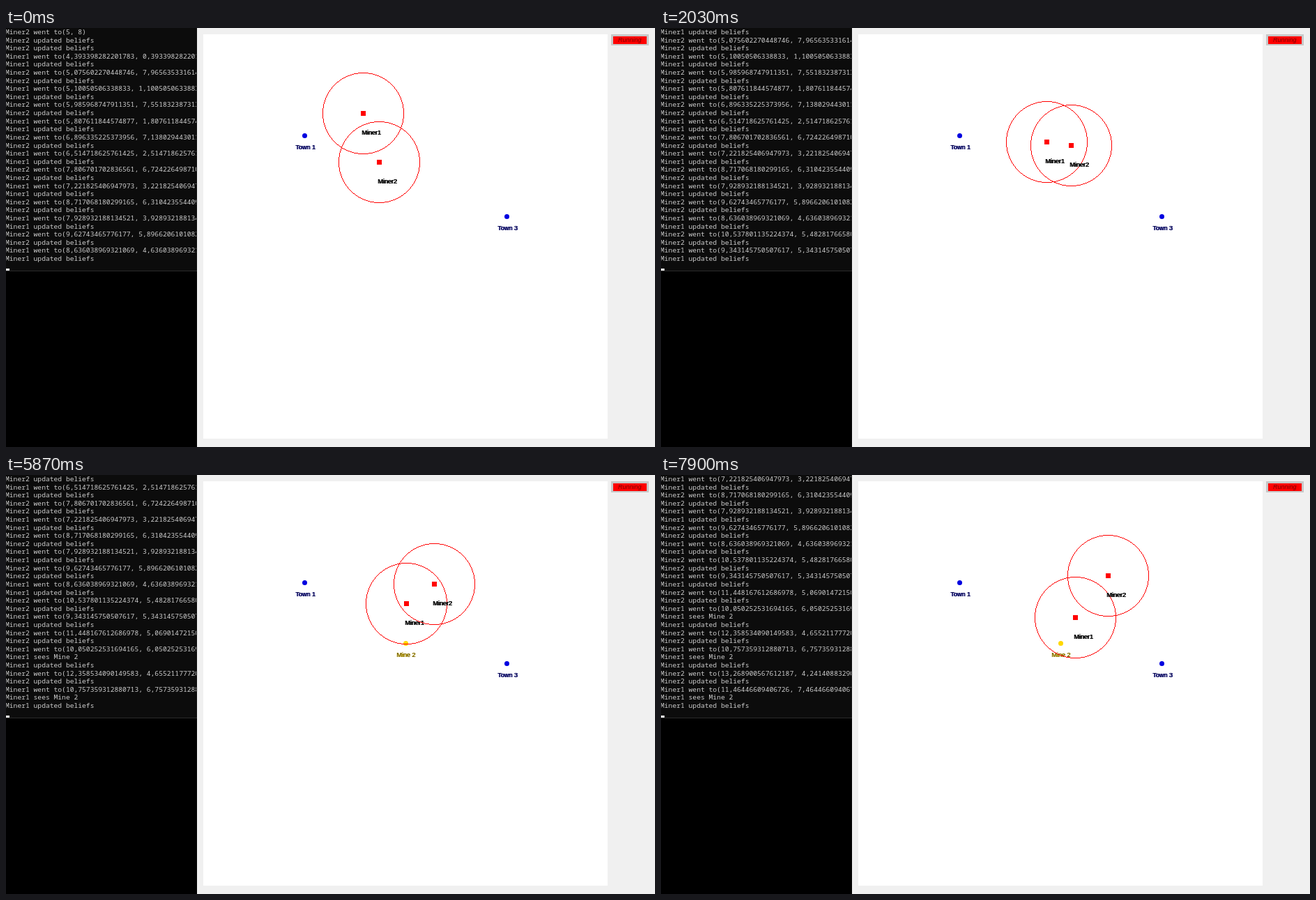
Recreate the animation shown at these times as an HTML page with a canvas. Size 931 by 601 pixels, loop 8000 ms.

```html
<!DOCTYPE html>
<html lang="en">
<head>
<meta charset="utf-8">
<title>Miners</title>
<style>
  html, body { margin: 0; width: 100%; height: 100%; overflow: hidden; background: #f0f0f0; }
  canvas { display: block; }
</style>
</head>
<body>
<canvas id="stage" width="931" height="601"></canvas>
<script>
const ctx = document.getElementById('stage').getContext('2d');
const LOOP = 8000;
const MOVES = [1010, 2030, 4060, 6270];
const PRINTS = [1810, 3840, 5870, 7900];
const SCROLL = [0, 4, 9, 14, 19];
const ROWS = 29, ROW_HEIGHT = 11.61;
const UNIT = 29, LEFT = 283, TOP = 9, SIGHT = 58;

const miner1 = {
  name: 'Miner1', start: 5, y: x => x - 4,
  xs: ['4,393398282201783', '5,10050506338833', '5,807611844574877', '6,514718625761425',
    '7,221825406947973', '7,928932188134521', '8,636038969321069', '9,343145750507617',
    '10,050252531694165', '10,757359312880713', '11,46446609406726']
};
const miner2 = {
  name: 'Miner2', start: 4, y: x => 8 - (x - 5) / 2.2,
  xs: ['5,075602270448746', '5,985968747911351', '6,896335225373956', '7,806701702836561',
    '8,717068180299165', '9,62743465776177', '10,537801135224374', '11,448167612686978',
    '12,358534090149583', '13,268900567612187']
};
const toNumber = text => parseFloat(text.replace(',', '.'));

function buildLog() {
  const lines = ['Miner2 went to(5, 8)', 'Miner2 updated beliefs', 'Miner2 updated beliefs'];
  const report = (miner, i) => {
    const x = toNumber(miner.xs[i]);
    const y = miner.y(x).toFixed(14).replace('.', ',');
    lines.push(`${miner.name} went to(${miner.xs[i]}, ${y})`);
    if (miner === miner1 && x > 10) lines.push('Miner1 sees Mine 2');
    lines.push(`${miner.name} updated beliefs`);
  };
  miner1.xs.forEach((_, i) => {
    if (i) report(miner2, i - 1);
    report(miner1, i);
  });
  return lines;
}
const log = buildLog();

function rect(color, x, y, w, h) {
  ctx.fillStyle = color;
  ctx.fillRect(x, y, w, h);
}

function text(string, x, y, color, font) {
  ctx.font = font;
  ctx.fillStyle = color;
  ctx.fillText(string, x, y);
}

// Two passes one pixel apart give the heavy label look.
function label(string, x, y, color) {
  const font = '9px "Liberation Sans", Arial, sans-serif';
  text(string, x, y, color, font);
  text(string, x + 1, y, color, font);
  text(string, x + 0.5, y, 'rgba(0,0,0,.6)', font);
}

// One-pixel circle without smoothing.
function ring(cx, cy, r) {
  ctx.fillStyle = '#f00';
  for (let a = 0; a <= r * Math.SQRT1_2 + 0.5; a++) {
    const b = Math.round(Math.sqrt(r * r - a * a));
    for (const [dx, dy] of [[a, b], [b, a]])
      for (const sx of [-1, 1])
        for (const sy of [-1, 1]) ctx.fillRect(cx + sx * dx, cy + sy * dy, 1, 1);
  }
}

function place(name, x, y, dotColor, textColor) {
  const px = LEFT + x * UNIT, py = TOP + y * UNIT;
  ctx.fillStyle = dotColor;
  ctx.beginPath();
  ctx.arc(px + 0.5, py + 0.5, 3.5, 0, Math.PI * 2);
  ctx.fill();
  label(name, px - 13, py + 20, textColor);
}

function drawMiner(miner, step) {
  const x = toNumber(miner.xs[miner.start + step]);
  const px = Math.floor(LEFT + x * UNIT), py = Math.floor(TOP + miner.y(x) * UNIT);
  ring(px, py, SIGHT);
  rect('#f00', px - 3, py - 3, 7, 7);
  label(miner.name, px - 2, py + 31, '#000');
}

function drawConsole(first) {
  rect('#000', 0, 0, 274, 601);
  rect('#0c0c0c', 0, 0, 274, 348);
  rect('#2b2b2b', 0, 348, 274, 1);
  ctx.save();
  ctx.beginPath();
  ctx.rect(0, 0, 273, 348);
  ctx.clip();
  log.slice(first, first + ROWS).forEach((line, i) =>
    text(line, -1, 9 + i * ROW_HEIGHT, '#ccc', '9.67px "Noto Sans Mono", monospace'));
  ctx.restore();
  rect('#f2f2f2', 0, 345, 5, 3);
}

function drawMap(step) {
  rect('#fff', LEFT, TOP, 580, 580);
  place('Town 1', 5, 5, '#0000e0', '#00008b');
  place('Town 3', 15, 9, '#0000e0', '#00008b');
  if (step > 2) place('Mine 2', 10, 8, '#ffd700', '#d8b400');
  drawMiner(miner1, step);
  drawMiner(miner2, step);
}

function drawButton() {
  rect('#c8c8c8', 868, 9, 54, 16);
  rect('#f00', 871, 12, 48, 11);
  text('Running', 878, 20, '#7a0000', 'italic 9px "Liberation Sans", Arial, sans-serif');
}

function frame(now) {
  const t = now % LOOP;
  const passed = times => times.filter(time => t >= time).length;
  rect('#f0f0f0', 0, 0, 931, 601);
  drawConsole(SCROLL[passed(PRINTS)]);
  drawMap(passed(MOVES));
  drawButton();
  requestAnimationFrame(frame);
}
frame(performance.now());
</script>
</body>
</html>
```
